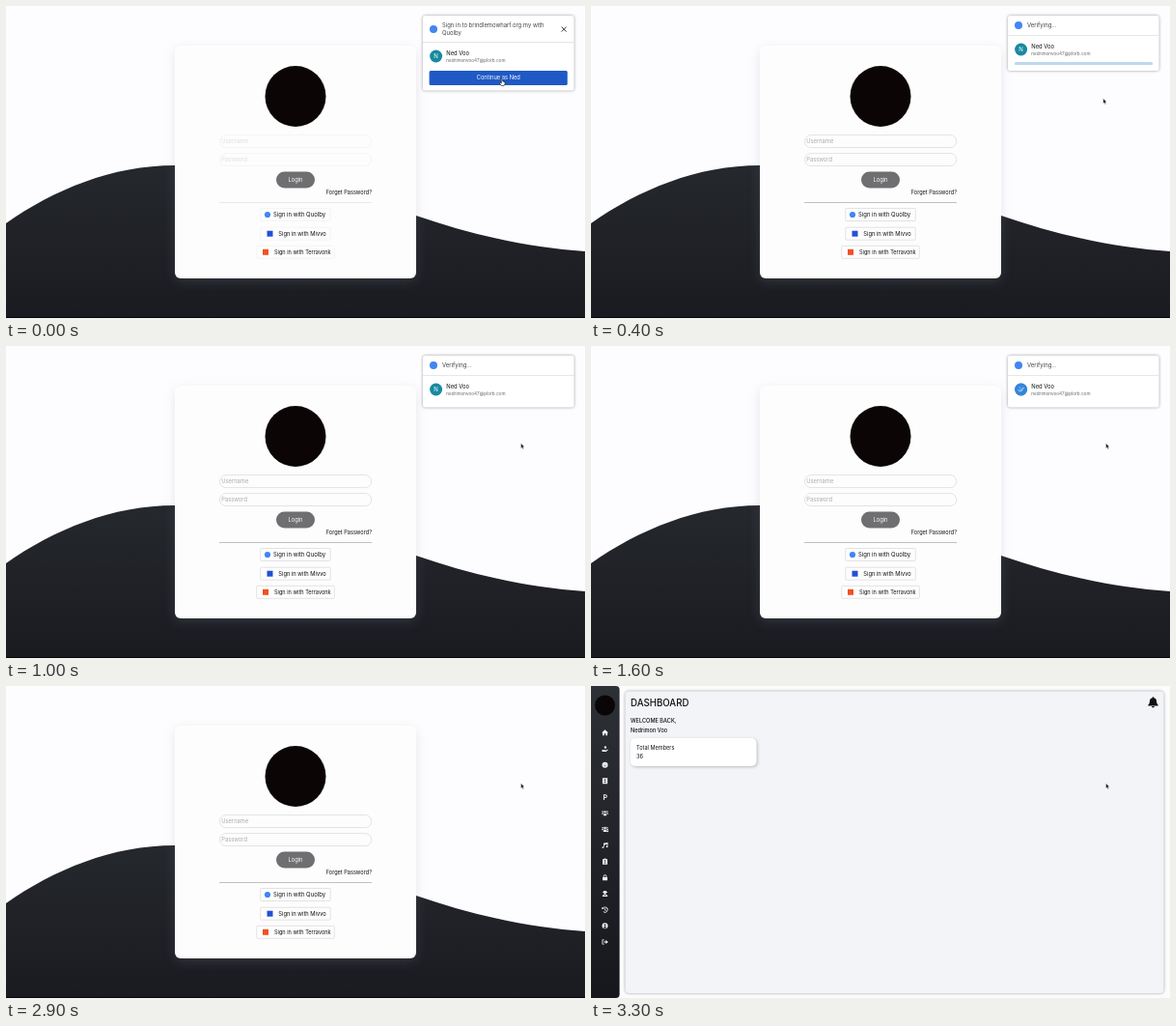
An HTML page that plays this animation: 600 by 323 pixels, repeating every 4.1 s.

```html
<!DOCTYPE html>
<html lang="en">
<head>
<meta charset="utf-8">
<title>Sign in</title>
<style>
html, body { margin: 0; width: 100%; height: 100%; overflow: hidden; background: #fdfcfe; }
svg { display: block; width: 100%; height: 100%; font: 5.75px Inter, "Open Sans", sans-serif; fill: #111; }
.mid { text-anchor: middle; }
.white { fill: #fff; }
.hint { fill: #aaa; }
.field { fill: #fefdfe; stroke: #dcdcdf; stroke-width: .8; }
.medium { font-weight: 500; }
.card { filter: drop-shadow(0 3px 6px rgba(140, 148, 158, .2)); }
.popup { filter: drop-shadow(0 .6px 1.4px rgba(0, 0, 0, .4)); }
.panel { filter: drop-shadow(0 .5px 1.5px rgba(0, 0, 0, .38)); }
.stat { filter: drop-shadow(1px 1px 1.5px rgba(0, 0, 0, .24)); }
</style>
</head>
<body>
<svg viewBox="0 0 600 323" preserveAspectRatio="none">
  <defs>
    <linearGradient id="dark" x1="0" y1="0" x2="0" y2="1">
      <stop stop-color="#25282d"/><stop offset="1" stop-color="#1a1b21"/>
    </linearGradient>
    <linearGradient id="side" x1="0" y1="0" x2="0" y2="1">
      <stop stop-color="#2d3035"/><stop offset="1" stop-color="#16171c"/>
    </linearGradient>
  </defs>

  <g id="login">
    <rect width="600" height="323" fill="#fdfcfe"/>
    <path fill="url(#dark)" d="M0 225C50 190 110 165 175 165C270 165 350 194 425 217C480 236 540 250 600 254V323H0Z"/>
    <rect y="322" width="600" height="1" fill="#050507"/>
    <rect class="card" x="175" y="41" width="250" height="241" rx="6" fill="#fefdfe"/>
    <circle cx="300" cy="93.5" r="31.5" fill="#0b0506"/>
    <g id="fields">
      <rect class="field" x="221.4" y="133.6" width="157.4" height="13" rx="6.5"/>
      <rect class="field" x="221.4" y="152.6" width="157.4" height="13" rx="6.5"/>
      <text class="hint" x="223.3" y="142.3">Username</text>
      <text class="hint" x="223.3" y="161.3">Password</text>
      <path d="M221 203.5H379" stroke="#b9b9bd" stroke-width=".9"/>
      <g id="frames"></g>
    </g>
    <rect x="280" y="171.5" width="40" height="17" rx="8.5" fill="#6f6e70"/>
    <text class="mid white" x="300" y="182.2">Login</text>
    <text x="379" y="195.2" text-anchor="end" font-size="5.6">Forget Password?</text>
    <g id="providers"></g>
  </g>

  <g id="popup">
    <rect id="sheet" class="popup white" x="432" y="10" width="156.6" rx="2.5"/>
    <circle id="mark" cx="443" r="4" fill="#4285f4"/>
    <g id="ask" fill="#444">
      <text x="452" y="22.4" font-size="5.9">Sign in to brindlemowharf.org.my with</text>
      <text x="452" y="30" font-size="5.9">Quolby</text>
      <path d="M575.7 21.6l5 5m0-5l-5 5" stroke="#222" stroke-width=".9"/>
      <rect x="438.6" y="67" width="143.2" height="15" rx="1.5" fill="#1f59c6"/>
      <text class="mid white" x="510.3" y="76.4">Continue as Ned</text>
    </g>
    <text id="verify" x="452" y="22.4" font-size="6" fill="#444">Verifying...</text>
    <g id="account">
      <path d="M432 30.6H588.6" stroke="#dedee2" stroke-width=".8"/>
      <circle cx="445.6" cy="45" r="6.5" fill="#188a9f"/>
      <text class="mid white" x="445.6" y="47.2" font-size="6">N</text>
      <g id="check">
        <circle cx="445.6" cy="45" r="6.5" fill="#4285f4"/>
        <path d="M442.6 45.2l2.1 2.1 4-4.3" fill="none" stroke="#fff" stroke-width="1"/>
      </g>
      <text class="medium" x="456.3" y="44.2" font-size="5.8" fill="#333">Ned Voo</text>
      <text x="456.3" y="51" font-size="4.65" fill="#666">nedrimonvoo47@plorb.com</text>
    </g>
    <g id="bar">
      <rect x="439" y="58" width="143" height="3" rx="1.5" fill="#dfe2e6"/>
      <rect id="run" y="58" height="3" rx="1.5" fill="#bfd8ef"/>
    </g>
  </g>

  <g id="dash">
    <rect width="600" height="323" fill="#fcfcfd"/>
    <rect x="-6" width="35.6" height="323" rx="4" fill="url(#side)"/>
    <circle cx="14.5" cy="20" r="10.5" fill="#0a0607"/>
    <rect class="panel" x="35.5" y="5.5" width="558" height="312.5" rx="4" fill="#f3f4f8"/>
    <text class="medium" x="41" y="21.2" font-size="9.7">DASHBOARD</text>
    <text class="medium" x="41" y="38.2" font-size="5.6">WELCOME BACK,</text>
    <text class="medium" x="41" y="47.8" font-size="5.6">Nedrimon Voo</text>
    <rect class="stat white" x="41" y="54" width="130.5" height="29" rx="5"/>
    <text x="47" y="66" font-size="5.6">Total Members</text>
    <text x="47" y="74.8">36</text>
    <path d="M582.5 11.3q.8 0 .8 1q2.8.6 2.8 3.9q0 2.6 1.6 3.5v.9h-10.4v-.9q1.6-.9 1.6-3.5q0-3.3 2.8-3.9q0-1 .8-1zM581 21.1h3q-.2 1.4-1.5 1.4t-1.5-1.4z"/>
    <g id="icons" fill="#f4f4f6" fill-rule="evenodd"></g>
  </g>

  <g id="cursor">
    <path id="hand" class="white" stroke="#111" stroke-width=".6" d="M-.7 0Q0-.8.7 0V2.6L3 3.2V5.5L2.2 7H-.8L-2.5 4.4-1.7 3.8-.7 4.6Z"/>
    <path id="arrow" stroke="#fff" stroke-width=".4" d="M0 0V5.2L1.2 4.1 2 6 2.9 5.6 2.1 3.8H3.7Z"/>
  </g>
</svg>
<script>
const $ = id => document.getElementById(id);
const set = (id, name, value) => $(id).setAttribute(name, value);
const show = (id, on) => set(id, "opacity", +on);
const ramp = (t, a, b) => Math.min(1, Math.max(0, (t - a) / (b - a)));
const disc = (x, y, r) => `M${x - r} ${y}a${r} ${r} 0 1 0 ${2 * r} 0a${r} ${r} 0 1 0 ${-2 * r} 0z`;

// name, y, box x, icon x, text x, font size, icon shape
const providers = [
  ["Quolby", 216, 263.7, 271, 277, 5.95, '<circle r="3.1" fill="#4285f4"/>'],
  ["Mivvo", 235.7, 263.7, 273.5, 282.3, 5.75, '<rect x="-3" y="-3" width="6" height="6" fill="#234fd6"/>'],
  ["Terravonk", 254.8, 259.7, 269, 278, 5.6, '<rect x="-3" y="-3" width="6" height="6" fill="#f25022"/>']
];
for (const [name, y, box, icon, x, size, shape] of providers) {
  $("frames").innerHTML += `<rect class="field" x="${box}" y="${y - 6.5}" width="${600 - 2 * box}" height="13" rx=".8"/>`;
  $("providers").innerHTML += `<g transform="translate(${icon} ${y})">${shape}</g>
    <text x="${x}" y="${y + 2.2}" font-size="${size}">Sign in with ${name}</text>`;
}

const people = disc(0, -1.3, 1.2) + disc(-2.4, -1.6, .8) + disc(2.4, -1.6, .8) +
  "M-1.8 2.6Q-1.8 .3 0 .3T1.8 2.6ZM-3.5 1Q-3.5-.5-2.2-.5L-1.4 .1-2.3 1ZM3.5 1Q3.5-.5 2.2-.5L1.4 .1 2.3 1Z";
const icons = [
  "M-3.4 0L0-3 3.4 0 2.5 .3V3H.8V.9H-.8V3H-2.5V.3Z",
  disc(.4, -1.4, 1.2) + "M-3 1H-1L0 1.6H1L3 .6 3.2 1.2 1.2 3H-3Z",
  disc(0, 0, 3) + disc(-1, -.7, .4) + disc(1, -.7, .4) + "M-1.5 .7Q0 2.6 1.5 .7Q0 1.6-1.5 .7Z",
  "M-2.6-3H2.6V3H-2.6Z" + disc(0, -1, .9) + "M-1.5 1.6Q0-.4 1.5 1.6Z",
  "M-1.6 3V-2.8H.4A1.9 1.9 0 0 1 .4 1H-.6V3ZM-.6-1.8V0H.4A.9 .9 0 0 0 .4-1.8Z",
  people,
  people + disc(2.7, 2, .9),
  "M-1.5-2.2L3-3V.3H2.2V-1.2L-.7-.6V1.4H-1.5Z" + disc(-2.1, 2.1, .95) + disc(2.1, 1.2, .95),
  "M-2.5-2.4H-.8V-3.2H.8V-2.4H2.5V3H-2.5Z" + disc(0, -.6, .8) + "M-1.4 1.9Q0-.2 1.4 1.9Z",
  "M-2.5-.4H-1.8V-1.4A1.8 1.8 0 0 1 1.8-1.4V-.4H2.5V3H-2.5ZM-.9-.4H.9V-1.4A.9 .9 0 0 0-.9-1.4Z",
  "M-2.6-1.5L-1.6-1.9-1.1-3.1H1.1L1.6-1.9 2.6-1.5V-1H-2.6ZM-1.6-.7H1.6Q1.5 .8 0 .9T-1.6-.7ZM-2.8 3Q-2.7 1-1 1L0 2.3 1 1Q2.7 1 2.8 3Z",
  "M-2.3-2A3 3 0 1 1-2 2.2L-1.4 1.6A2.2 2.2 0 1 0-1.7-1.4L-.9-.6H-3.2V-2.9ZM-.4-1.5H.4V0L1.3 .8 .8 1.3-.4 .4Z",
  disc(0, 0, 3) + disc(0, -.8, 1) + "M-1.8 1.6Q0-.4 1.8 1.6Q0 3-1.8 1.6Z",
  "M-.8-2.6H-3V2.6H-.8V1.8H-2.2V-1.8H-.8ZM-1.2-.6H.8V-2L3.3 0 .8 2V.6H-1.2Z"
];
$("icons").innerHTML = icons.map((d, i) =>
  `<path transform="translate(14.5 ${48.3 + i * 16.67})" d="${d}"/>`).join("");

function draw() {
  const t = Math.floor(performance.now() % 4100 / 100) * 100;
  const asking = t < 200, loading = !asking && t < 600;

  set("fields", "opacity", t < 100 ? .35 : 1);
  show("dash", t >= 3000);
  show("icons", t >= 3300);

  set("popup", "opacity", 1 - ramp(t, 2000, 2400));
  set("sheet", "height", asking ? 77.5 : loading ? 57 : 53.6);
  set("mark", "cy", asking ? 24 : 20);
  set("account", "transform", `translate(0 ${asking ? 7 : 0})`);
  show("ask", asking);
  show("verify", !asking);
  show("check", ramp(t, 1400, 1700));
  show("bar", loading);
  const head = ramp(t, 100, 400), tail = ramp(t, 400, 600);
  set("run", "x", 439 + 143 * tail);
  set("run", "width", 143 * (head - tail));

  const away = ramp(t, 100, 400), drift = ramp(t, 500, 800);
  set("cursor", "transform",
    `translate(${514 + 16.8 * away + 2.8 * drift} ${75.5 + 20.3 * away + 5 * drift})`);
  show("hand", asking);
  show("arrow", !asking);
  requestAnimationFrame(draw);
}
draw();
</script>
</body>
</html>
```
